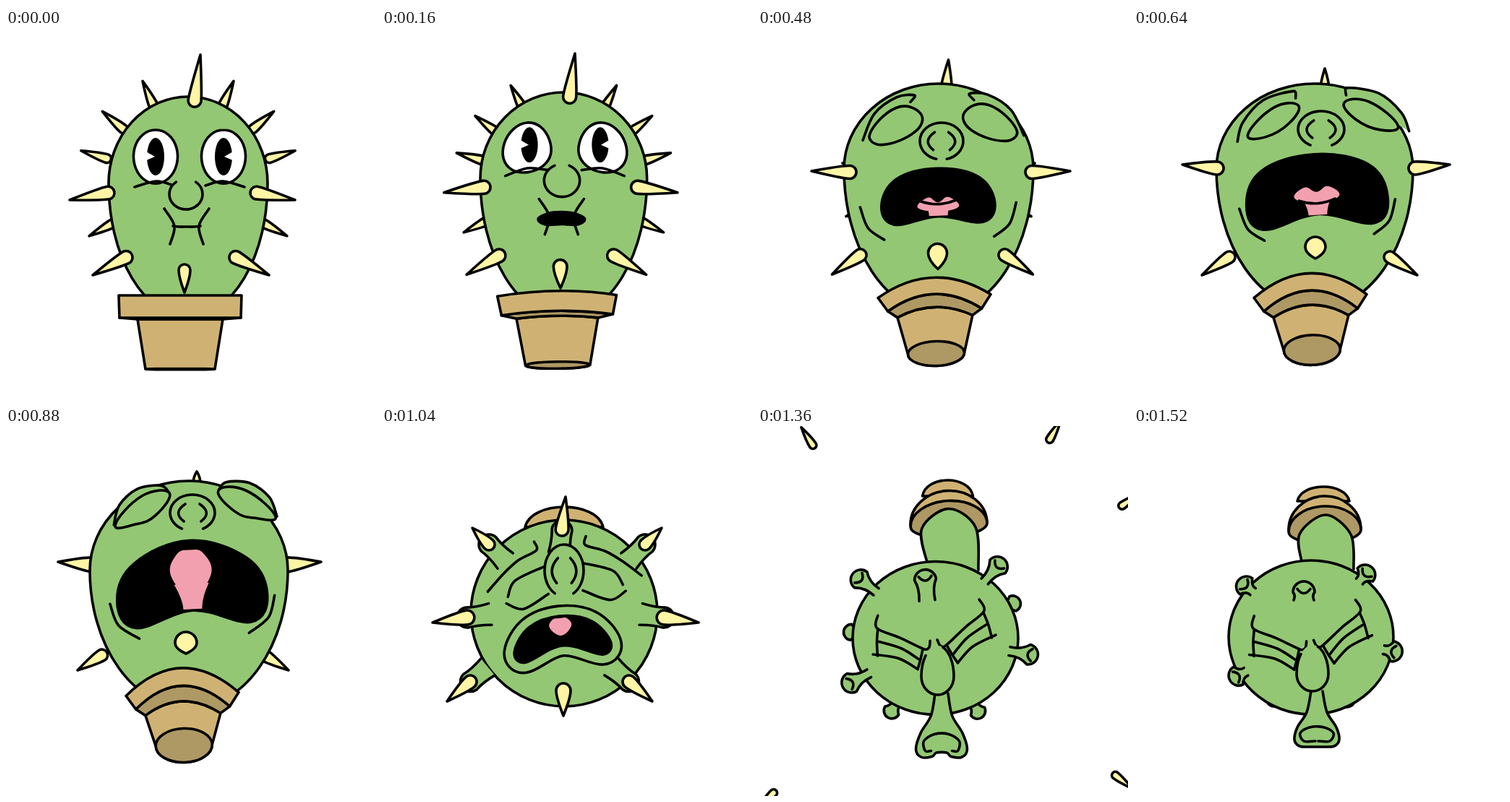
Animation, 512 px wide and 512 px high, one loop 1600 ms. Source, as an HTML page:

```html
<!DOCTYPE html>
<html lang="en">
<head>
<meta charset="utf-8">
<title>Sneezing cactus</title>
<style>
html, body { margin: 0; width: 100%; height: 100%; overflow: hidden; background: #fff; }
svg { display: block; width: 100vw; height: 100vh; }
</style>
</head>
<body>
<svg id="stage" viewBox="0 0 512 512" fill="none" stroke="#000" stroke-width="3.6" stroke-linejoin="round" stroke-linecap="round"></svg>
<script>
const GREEN = '#93c774', YELLOW = '#fff5a5', TAN = '#cfb273', DARK = '#ae9864', PINK = '#f2a0af';
const LOOP = 1600, STEP = 80;

// The rig. Face parts are one half, x measured outwards from the face axis, and get mirrored.
// body, nose: cx, cy, rx, height above, height below. face: x, y, tilt. jaw: shift of the mouth axis.
// side, low, high: spike pairs as axis, base dx, y, tip dx, y, radius. tuck: how many spikes sit behind.
const calm = {
  time: 80, body: [252, 215, 110, 120, 185], face: [254, 178, 0], jaw: -4, pot: 0, ring: [155, 1], tuck: 0,
  top: [261, 101, 269, 37, 9], bottom: [247, 335, 247, 366, 8],
  side: [244, 102, 228, 156, 238, 9], low: [242, 75, 317, 122, 342, 9],
  eye: [47, -37, 18, -12, 29, 30, 65, 30, 76, -12], pupil: [47, 0, 12, 26], pouch: [76, 42, 46, 34, 22, 40],
  nose: [249, 230, 23, 21, 21], gap: 21,
  mouth: [0, 97, 10, 97, 19, 96, 10, 97, 0, 97], fold: [31, 72, 17, 96, 23, 121]
};
const worried = {
  time: 320, body: [250, 195, 126, 118, 205], face: [251, 138, 0], jaw: -6, pot: 0.55, ring: [152, 0.8], tuck: 0,
  top: [257, 84, 263, 32, 9], bottom: [246, 320, 247, 348, 12],
  side: [254, 115, 205, 173, 207, 9], low: [240, 88, 311, 129, 340, 9],
  eye: [62, -27, 29, -8, 32, 18, 90, 34, 99, 8], pupil: [53, -9, 11, 21], pouch: [95, 36, 64, 20, 26, 16],
  brow: [104, 16, 79, -30, 46, -45, 39, -39, 53, -31],
  nose: [249, 173, 28, 26, 26], gap: 0,
  mouth: [0, 76, 38, 83, 59, 107, 47, 128, 0, 126], tongue: [0, 118, 12, 111, 26, 124, 0, 126]
};
const inhale = {
  time: 640, body: [250, 195, 136, 118, 195], face: [261, 135, -3.5], jaw: -14, pot: 0.88, ring: [120, 0.6], tuck: 1, shut: true,
  top: [264, 85, 264, 56, 6], bottom: [251, 303, 251, 319, 14],
  side: [252, 137, 194, 185, 189, 9], low: [243, 111, 317, 149, 342, 8],
  eye: [66, -29, 32, -30, 46, -6, 80, 11, 104, 6], brow: [119, 15, 110, -11, 80, -40, 37, -50, 35, -40],
  nose: [259, 140, 32, 25, 25], gap: -17, sniff: true,
  mouth: [0, 39, 75, 58, 98, 107, 76, 139, 0, 122], tongue: [0, 91, 16, 84, 31, 98, 0, 108],
  stem: [17, 106, 13, 123], crease: true, fold: [108, 108, 98, 137, 76, 154]
};
const brink = {
  time: 880, body: [253, 200, 137, 124, 191], face: [261, 110, -3], jaw: -10, pot: 1, tuck: 2, shut: true,
  top: [264, 80, 264, 63, 5], bottom: [249, 300, 249, 315, 15],
  side: [254, 134, 192, 182, 188, 10], low: [245, 112, 317, 146, 338, 8],
  eye: [72, -17, 34, -19, 55, 11, 84, 22, 111, 21], brow: [113, 21, 104, -6, 78, -27, 45, -30, 34, -19],
  nose: [258, 120, 31, 25, 25], gap: -17, sniff: true,
  mouth: [0, 48, 78, 76, 104, 127, 80, 165, 0, 145], tongue: [0, 61, 18, 66, 28, 95, 0, 125],
  stem: [24, 108, 13, 143], fold: [114, 130, 104, 160, 76, 180]
};
const lurch = {
  time: 1040, body: [252, 259, 129, 129, 129], face: [254, 230, -6], jaw: -12, tuck: 0, stubs: true,
  cap: [252, 140, 54, 28],
  top: [249, 144, 254, 98, 9], bottom: [251, 366, 251, 401, 10],
  side: [254, 136, 265, 184, 272, 10], low: [232, 110, 354, 142, 381, 9], high: [256, 108, 164, 131, 141, 8],
  pouch: [83, 7, 60, 17, 24, 0], lid: [80, -2, 68, -23, 27, -38],
  wrinkle: [107, -12, 82, -35, 60, -51, 34, -62, 36, -74],
  nose: [252, 200, 27, 36, 36], gap: -14, sniff: true,
  mouth: [0, 32, 43, 43, 67, 75, 54, 91, 0, 73], tongue: [0, 35, 10, 36, 15, 47, 0, 59], lips: 14
};
const blast = {
  time: 1200, body: [246, 295, 115, 106, 105], face: [244, 305, -9], squint: true,
  cap: [263, 90, 34, 24], brim: [264, 127, 56, 45, -5],
  neck: [237, 193, 224, 135, 262, 106, 302, 130, 306, 201],
  reach: [148, 134], crown: [233, 242, 228, 195, 15, 8],
  nose: [250, 350, 23, 45, 27], gap: 17,
  trunk: [255, 10, 373, 15, 405, 31, 433, 40, 460, 33, 473, 19, 471, 10, 460],
  snout: [27, 463, 27, 463, 26, 447, 10, 436]
};
const spent = {
  time: 1520, body: [245, 292, 114, 106, 107], face: [245, 306, -9], squint: true,
  cap: [262, 104, 36, 20], brim: [264, 143, 50, 46, -2],
  neck: [233, 192, 229, 150, 265, 123, 300, 150, 304, 198],
  reach: [114, 100], crown: [235, 241, 235, 230, 15, 14],
  nose: [247, 343, 22, 40, 24], gap: 17,
  trunk: [253, 8, 367, 14, 396, 27, 417, 31, 434, 24, 443, 8, 444, 4, 444],
  snout: [2, 436, 18, 436, 23, 425, 10, 417]
};
const poses = [calm, worried, inhale, brink, lurch, blast, spent];

const lerp = (a, b, k) => a + (b - a) * k;
const rad = deg => deg * Math.PI / 180;
const polar = (cx, cy, deg, r) => [cx + r * Math.cos(rad(deg)), cy + r * Math.sin(rad(deg))];
const fmt = p => p.map(v => v.toFixed(1)).join(' ');

function blend(a, b, k) {
  if (typeof a === 'number' && typeof b === 'number') return lerp(a, b, k);
  if (Array.isArray(a) && Array.isArray(b)) return a.map((v, i) => lerp(v, b[i], k));
  return a;
}

const points = (flat, sx = 1) =>
  flat.flatMap((v, i) => i % 2 ? [] : [[v * sx, flat[i + 1]]]);

// Right half followed by its mirrored left half, as one outline
const whole = flat => points(flat).concat(points(flat, -1).filter(p => p[0]).reverse());

// Smooth curve; the closed tension makes evenly spread points form a circle.
function curve(pts, closed) {
  const n = pts.length;
  const pull = closed ? 2 / 3 * Math.tan(Math.PI / 2 / n) / Math.sin(2 * Math.PI / n) : 1 / 6;
  const at = i => pts[closed ? (i + n) % n : Math.max(0, Math.min(n - 1, i))];
  let d = 'M' + fmt(pts[0]);
  for (let i = 0; i < (closed ? n : n - 1); i++) {
    const a = at(i - 1), b = at(i), c = at(i + 1), e = at(i + 2);
    const span = Math.hypot(c[0] - b[0], c[1] - b[1]);
    const handle = (p, from, to, sign) => {
      const x = to[0] - from[0], y = to[1] - from[1];
      const s = sign * Math.min(pull, 0.45 * span / (Math.hypot(x, y) || 1));
      return fmt([p[0] + x * s, p[1] + y * s]);
    };
    d += `C${handle(b, a, c, 1)} ${handle(c, b, e, -1)} ${fmt(c)}`;
  }
  return closed ? d + 'Z' : d;
}

const path = (d, fill = 'none', extra = '') => `<path d="${d}" fill="${fill}" ${extra}/>`;
const group = (x, y, tilt, inner) => `<g transform="translate(${x} ${y}) rotate(${tilt})">${inner}</g>`;
const both = (flat, fill, closed) =>
  flat ? [-1, 1].map(s => path(curve(points(flat, s), closed), fill)).join('') : '';
const egg = ([x, y, rx, up, down]) =>
  `M${x - rx} ${y}A${rx} ${up} 0 0 1 ${x + rx} ${y}A${rx} ${down} 0 0 1 ${x - rx} ${y}Z`;

// Local axes from base to end: place(along, across)
function axes(x, y, ex, ey) {
  const len = Math.hypot(ex - x, ey - y) || 1, ux = (ex - x) / len, uy = (ey - y) / len;
  return { len, place: (s, n) => fmt([x + ux * s - uy * n, y + uy * s + ux * n]) };
}

function spike(x, y, tx, ty, r) {
  const { len, place } = axes(x, y, tx, ty), bulge = Math.min(0.55 * len, 10);
  return path(`M${place(0, r)}A${r} ${r} 0 0 1 ${place(0, -r)}Q${place(bulge, -r)} ${place(len, 0)}Q${place(bulge, r)} ${place(0, r)}Z`, YELLOW);
}

function stalk(x, y, kx, ky, r, w, open) {
  const { len, place } = axes(x, y, kx, ky), neck = len * 0.6;
  const rim = len + r * 0.3;
  return path(`M${place(0, w)}Q${place(neck, w * 0.8)} ${place(len, r)}A${r} ${r} 0 0 0 ${place(len, -r)}Q${place(neck, -w * 0.8)} ${place(0, -w)}`, GREEN) +
    (open ? path(`M${place(rim, r * 0.6)}Q${place(len - r * 0.5, 0)} ${place(rim, -r * 0.6)}`) : '');
}

function stubbed(pose, x, y, tx, ty, r) {
  const { place } = axes(x, y, tx, ty);
  const root = place(-32, 0).split(' ').map(Number);
  return (pose.stubs ? stalk(...root, x, y, 14, 15) : '') + spike(x, y, tx, ty, r);
}

const pair = (pose, [axis, dx, y, tx, ty, r]) =>
  [-1, 1].map(s => stubbed(pose, axis + s * dx, y, axis + s * tx, ty, r)).join('');

// Small spikes fanned around the back of the body
function fan({ body, ring: [reach, squeeze] }) {
  return [28, -17, -40, -66].flatMap(a => [a * squeeze, 180 - a * squeeze]).map(a =>
    spike(...polar(body[0], 215, a, reach - 38), ...polar(body[0], 215, a, reach), 6)).join('');
}

function stalks({ body: [cx, cy], reach }, front) {
  const angles = front ? [218, -49, 10, 152] : [184, -24, 121, 60];
  const r = front ? 14 : 11, far = reach[front ? 0 : 1];
  return angles.map(a =>
    stalk(...polar(cx, cy, a, Math.min(104, far - 12)), ...polar(cx, cy, a, far), r, 6, front)).join('');
}

// The pot tips towards the viewer's feet as k goes from 0 to 1.
function pot(k) {
  const e = Math.min(1, 2 * k), bow = 36 * k;
  const row = (w0, w1, y0, y1, lift) => ({ w: lerp(w0, w1, e), y: lerp(y0, y1, e), lift });
  const arc = ({ w, y, lift }, s) => `${-s * w} ${y}Q0 ${y - 2 * lift} ${s * w} ${y}`;
  const band = (a, b, fill) => path(`M${arc(a, 1)}L${arc(b, -1)}Z`, fill);
  const rim = row(85, 78, 0, 1, bow), edge = row(84, 65, 31, 20, bow * 0.85), neck = row(59, 52, 33, 29, bow * 0.5);
  const foot = lerp(48, 39, e), y = 102 - 30 * k, ry = 23 * k + 0.5;
  return group(241 + 3 * e, 370, -1.8 * e,
    path(`M${arc(neck, 1)}L${foot} ${y}A${foot} ${ry} 0 0 1 ${-foot} ${y}Z`, TAN) +
    path(egg([0, y, foot, ry, ry]), DARK) + band(edge, neck, DARK) + band(rim, edge, TAN));
}

function hat({ cap: [x, y, w, h], brim, neck }) {
  let out = path(`M${x - w} ${y}C${x - w * 0.85} ${y - h * 1.33} ${x + w * 0.85} ${y - h * 1.33} ${x + w} ${y}Z`, TAN);
  if (brim) {
    const [bx, by, bw, bh, tilt] = brim;
    out += group(bx, by, tilt, path(egg([0, 0, bw, bh, 12]), TAN) + path(egg([0, 2, bw, bh - 12, 17]), DARK));
    out += path(curve(points(neck)), GREEN);
  }
  return out;
}

function pupils([x, y, rx, ry]) {
  const edge = x + rx + 3;
  return [-1, 1].map(s => path(egg([s * x, y, rx, ry, ry]), '#000', 'stroke="none"') +
    path(`M${s * (x + 1)} ${y}L${s * edge} ${y - 8}V${y + 6}Z`, '#fff', 'stroke="none"')).join('');
}

function nose([x, y, rx, up, down], gap, sniff) {
  const mid = gap > 0 ? 25 : 75, half = Math.abs(gap) / 2;
  let out = path(egg([x, y, rx, up, down]), GREEN, 'stroke="none"') +
    path(egg([x, y, rx, up, down]), 'none',
      half > 0.5 ? `pathLength="100" stroke-dasharray="${mid - half} ${2 * half} ${100 - mid - half} 0"` : '');
  if (sniff) for (const s of [-1, 1]) {
    const px = f => x + s * f * rx;
    out += path(`M${px(0.32)} ${y - up * 0.48}Q${px(0.9)} ${y} ${px(0.38)} ${y + up * 0.48}`);
  }
  return out;
}

function mouth({ mouth, lips, tongue, stem, crease, fold }) {
  const shape = curve(whole(mouth), true);
  const bare = 'stroke="none"';
  let out = both(fold);
  if (lips) out += path(shape, 'none', `stroke-width="${2 * lips + 3.6}"`) +
    path(shape, 'none', `stroke="${GREEN}" stroke-width="${2 * lips - 3.6}"`);
  out += path(shape, '#000');
  if (stem) {
    const [a, y, b, end] = stem;
    out += path(`M${-a} ${y}H${a}Q${b} ${lerp(y, end, 0.6)} ${b} ${end}H${-b}Q${-b} ${lerp(y, end, 0.6)} ${-a} ${y}Z`, PINK, bare);
  }
  if (tongue) out += path(curve(whole(tongue), true), PINK, bare);
  if (crease) out += path('M-25 102Q0 112 25 102');
  return out;
}

const squint = () => [
  [71, -55, 75, -38, 46, -20, 15, 1, 8, 0, 5, -9],
  [74, -36, 78, -19, 80, 0], [17, 1, 22, 14, 28, 27],
  [86, -3, 52, 8, 28, 27], [75, -19, 46, -5, 24, 14]
].map(line => both(line)).join('');

function face(p) {
  let inner = both(p.brow, GREEN);
  if (p.eye) inner = (p.shut ? inner : '') + both(p.eye, p.shut ? GREEN : '#fff', true) +
    (p.pupil ? pupils(p.pupil) : '') + (p.shut ? '' : inner);
  inner += both(p.pouch) + both(p.lid) + both(p.wrinkle);
  if (p.squint) inner += squint();
  if (p.mouth) inner += group(p.jaw, 0, 0, mouth(p));
  return group(...p.face, inner);
}

function trunk([axis, ...half], snout) {
  const open = flat => points(flat).concat(points(flat, -1).reverse());
  return group(axis, 0, 0, path(curve(open(half)), GREEN) + path(curve(open(snout))));
}

// Loose spikes fly straight out: a far ring of large ones, a near ring of small ones.
function spray(t) {
  if (t < 1120 || t > 1360) return '';
  const far = 1 + (t - 1200) / STEP * (t < 1200 ? 0.22 : 0.45);
  const shoot = (angles, reach, len, r) => angles.map(a =>
    spike(...polar(247, 290, a, reach * far), ...polar(247, 290, a, reach * far + len), r)).join('');
  return shoot([-47, 19, 61, 120, 145, 182, 218], 220, 44, 8) +
    shoot([-60, -35, -20, -8, 38, 136, 168, 197, 237, 260], 165, 30, 5);
}

function poseAt(t) {
  const now = Math.max(t, poses[0].time);
  const i = poses.findLastIndex(p => p.time <= now);
  const from = poses[i], to = poses[i + 1] || from;
  const k = to === from ? 0 : (now - from.time) / (to.time - from.time);
  const [near, other, share] = k < 0.5 ? [from, to, k] : [to, from, 1 - k];
  return Object.fromEntries(Object.keys(near).map(key => [key, blend(near[key], other[key], share)]));
}

function render(t) {
  const p = poseAt(t);
  const back = [], front = [];
  if (p.cap) back.push(hat(p));
  if (p.ring) back.push(fan(p));
  if (p.reach) {
    back.push(stalks(p, false));
    front.push(stalks(p, true), stalk(...p.crown, true));
  }
  if (p.top) {
    (p.tuck >= 0.5 ? back : front).push(stubbed(p, ...p.top));
    (p.tuck >= 1.5 ? back : front).push(pair(p, p.side), pair(p, p.low));
    if (p.high) front.push(pair(p, p.high));
    front.push(spike(...p.bottom));
  }
  if (p.trunk) front.push(trunk(p.trunk, p.snout));
  front.push(face(p), nose(p.nose, p.gap, p.sniff));
  if (p.pot !== undefined) front.push(pot(p.pot));
  return back.join('') + path(egg(p.body), GREEN) + front.join('') + spray(t);
}

const stage = document.getElementById('stage');
const start = performance.now();
let shown = -1;

function tick() {
  const t = Math.floor((performance.now() - start) % LOOP / STEP) * STEP;
  if (t !== shown) stage.innerHTML = render(shown = t);
  requestAnimationFrame(tick);
}
tick();
</script>
</body>
</html>
```
